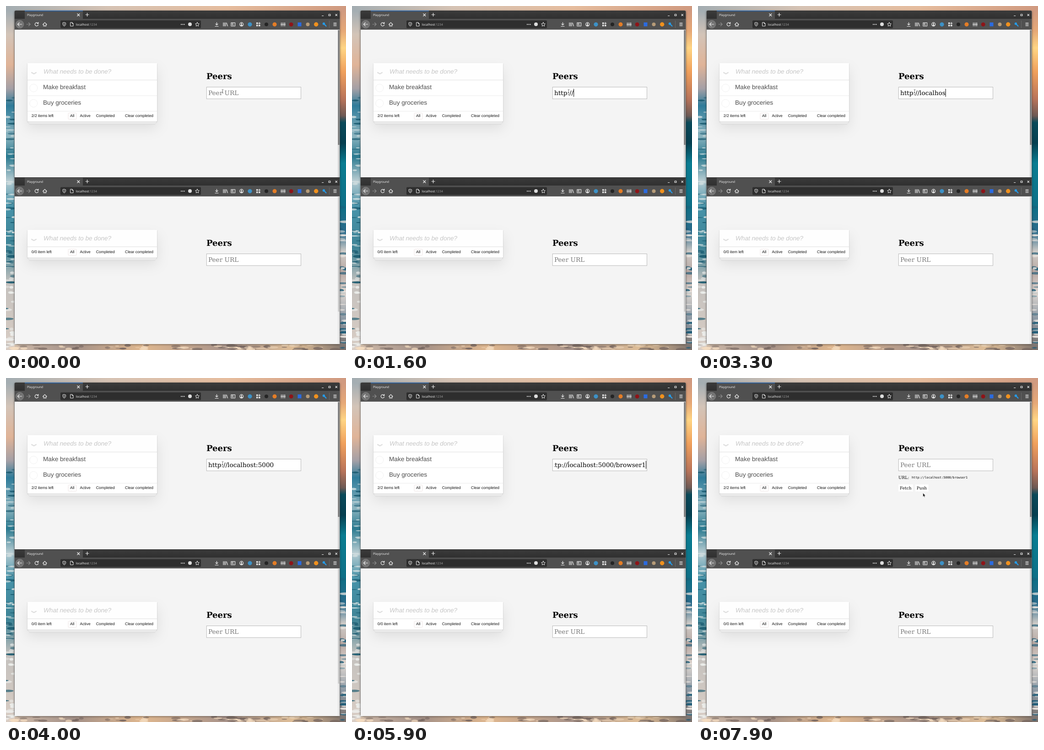
An HTML page that plays this animation: 743 px wide and 753 px high, repeating every 8000 ms.

```html
<!DOCTYPE html>
<html lang="en">
<head>
<meta charset="utf-8">
<title>Playground</title>
<style>
  html, body { margin: 0; width: 100%; height: 100%; overflow: hidden; }
  svg { display: block; width: 743px; height: 753px; }
  text { text-rendering: geometricPrecision; white-space: pre; }
  .ui { font: 6.8px "Noto Sans", sans-serif; fill: #f2f2f2; }
  .tab { font-size: 6.5px; }
  .todo { font: 13.6px "Liberation Sans", Arial, sans-serif; fill: #4d4d4d; }
  .prompt { font-style: italic; fill: #c6c6c6; }
  .foot { font: 8.5px "Liberation Sans", Arial, sans-serif; fill: #111; }
  .serif { font: 13.6px "DejaVu Serif", serif; fill: #000; }
  .head { font: bold 18px "DejaVu Serif", serif; }
  .small { font: 9px "DejaVu Serif", serif; }
  .mono { font: 6.78px "DejaVu Sans Mono", monospace; }
  .hint { fill: #777; }
  .line { fill: none; stroke: #ededed; stroke-width: 1.2; stroke-linecap: round; stroke-linejoin: round; }
  .thin { stroke-width: 1; }
  .window { filter: drop-shadow(0 1px 2px rgba(0,0,0,.45)); }
  .card { filter: drop-shadow(0 1px 1.2px rgba(0,0,0,.2)) drop-shadow(0 14px 14px rgba(0,0,0,.09)); }
</style>
</head>
<body>
<svg viewBox="0 0 743 753">
  <defs>
    <linearGradient id="sky">
      <stop offset="0" stop-color="#a3adb2"/><stop offset=".3" stop-color="#d6c3b4"/>
      <stop offset=".65" stop-color="#e6bd9e"/><stop offset="1" stop-color="#d09a80"/>
    </linearGradient>
    <linearGradient id="sand">
      <stop offset="0" stop-color="#d5c0ae"/><stop offset=".2" stop-color="#a39087"/><stop offset=".4" stop-color="#dfb78f"/>
      <stop offset=".65" stop-color="#a8938a"/><stop offset=".85" stop-color="#e0bf98"/><stop offset="1" stop-color="#7d716b"/>
    </linearGradient>
    <linearGradient id="west" x2="0" y2="1">
      <stop offset="0" stop-color="#a3adb2"/><stop offset=".07" stop-color="#d3c4b8"/><stop offset=".16" stop-color="#e0b498"/>
      <stop offset=".23" stop-color="#a5a0a6"/><stop offset=".28" stop-color="#2f7c9a"/><stop offset=".37" stop-color="#8db5c0"/>
      <stop offset=".43" stop-color="#2b7a90"/><stop offset=".5" stop-color="#b6cbd1"/><stop offset=".58" stop-color="#4793a9"/>
      <stop offset=".7" stop-color="#3f8496"/><stop offset=".8" stop-color="#c4c1be"/><stop offset="1" stop-color="#d9cdc4"/>
    </linearGradient>
    <linearGradient id="east" x2="0" y2="1">
      <stop offset="0" stop-color="#d09a80"/><stop offset=".06" stop-color="#e6a877"/><stop offset=".11" stop-color="#ffd584"/>
      <stop offset=".18" stop-color="#f0a05c"/><stop offset=".26" stop-color="#b9745a"/><stop offset=".31" stop-color="#6e5a55"/>
      <stop offset=".33" stop-color="#0a4a5a"/><stop offset=".39" stop-color="#063f50"/><stop offset=".45" stop-color="#0a7d92"/>
      <stop offset=".58" stop-color="#0f6f86"/><stop offset=".65" stop-color="#2b6b8b"/><stop offset=".71" stop-color="#d0ccc8"/>
      <stop offset=".77" stop-color="#b8a9a4"/><stop offset=".83" stop-color="#ded6d0"/><stop offset=".91" stop-color="#8b98a4"/>
      <stop offset="1" stop-color="#7d716b"/>
    </linearGradient>
    <linearGradient id="strip" x2="0" y2="1">
      <stop offset="0" stop-color="#3b3b3b"/><stop offset="1" stop-color="#303030"/>
    </linearGradient>
    <clipPath id="field"><rect x="442" y="179" width="201.5" height="23"/></clipPath>
    <clipPath id="frame"><rect x="18.5" y="10" width="711" height="365"/></clipPath>

    <g id="chrome">
      <path d="M18.5 375V13q0-3 3-3H726.5q3 0 3 3V375Z" fill="#f4f4f4"/>
      <path d="M18.5 28V13q0-3 3-3H726.5q3 0 3 3V28Z" fill="url(#strip)"/>
      <path d="M18.5 28H729.5V51.7H18.5ZM41 10.5H168V28H41Z" fill="#505050"/>
      <text class="ui tab" x="46" y="21.7">Playground</text>
      <path class="line" d="M155.800 17l5 5m0-5l-5 5M174 19h7m-3.500-3.500v7"/>
      <path class="line" d="M690.500 21.500h3.200M705.300 18h3.500v3.500h-3.500ZM720 17.800l3.600 3.600m0-3.600l-3.600 3.600"/>

      <circle cx="30" cy="40" r="8.700" fill="#737373" stroke="#8c8c8c" stroke-width=".7"/>
      <path class="line" d="M34.500 40h-9m3.700-3.800l-3.800 3.800 3.800 3.800"/>
      <path class="line" d="M45 40h8m-3.500-3.500l3.500 3.500-3.500 3.500" style="stroke:#8d8d8d"/>
      <path class="line" d="M70 38a3.700 3.700 0 1 0 .5 3M70.700 35.700v2.800h-2.800M80.500 40.500l4.300-4.300 4.300 4.300M82 40v4h5.600v-4M84.800 44v-2"/>

      <rect x="119" y="31.500" width="307" height="17" rx="2" fill="#2e2e2e"/>
      <path class="line thin" d="M127.300 36l3.200 1v3q-.3 2.700-3.200 4.200-2.900-1.500-3.200-4.200v-3ZM127.300 38v4M141 36h3.500l2.500 2.500v5.500h-6ZM144.500 36v2.500h2.500"/>
      <text class="ui" x="152.700" y="42.500">localhost<tspan fill="#9a9a9a">:1234</tspan></text>
      <path class="line" d="M383 40.300h.01M386.300 40.300h.01M389.600 40.300h.01" style="stroke-width:2.200"/>
      <circle cx="402" cy="40" r="4" fill="#dcdcdc"/>
      <path class="line thin" d="M418 35.800l1.300 2.800 3 .4-2.200 2.100.6 3.100-2.700-1.500-2.700 1.500.6-3.100-2.200-2.100 3-.4Z"/>

      <path class="line" d="M460.500 36v5.500m-2.600-2.400l2.600 2.600 2.600-2.600M457 44.500h7"/>
      <path class="line" d="M475 36.500v7.500M477.500 36.500v7.500M480 36.500v7.500M482 37l2.300 7"/>
      <path class="line" d="M492 36.500h8.500v7.500h-8.500ZM496 36.500v7.500M493.700 38.500h.8m-.8 2h.8"/>
      <circle class="line" cx="514.700" cy="40.200" r="4"/>
      <path d="M512 43q0-2 2.700-2 2.700 0 2.700 2l-2.700 1Z" fill="#ededed"/>
      <circle cx="514.700" cy="39" r="1.500" fill="#ededed"/>
      <circle cx="533" cy="40.300" r="4.600" fill="#3d91c6"/>
      <path d="M547 36h3.500v3.500h-3.500Zm0 5h3.500v3.500h-3.500Zm5 0h3.500v3.500h-3.500Z" fill="#e6e6e6"/>
      <path class="line" d="M551.800 37.800h4m-2-2v4"/>
      <circle cx="569" cy="40.300" r="4" fill="#242424"/>
      <circle cx="587" cy="40.300" r="4.500" fill="#e47d26"/>
      <path class="line thin" d="M601.500 36.500v7.500M604.300 36.500v7.500M607.100 36.500v7.500M609.500 36.500v7.500M600.500 40.300h10"/>
      <circle cx="623.200" cy="40.300" r="4.400" fill="#8e1418"/>
      <rect x="637.500" y="36" width="8" height="8.500" fill="#2b6be0"/>
      <circle cx="659.500" cy="40.300" r="4" fill="#b69b78"/>
      <circle cx="677.700" cy="40.300" r="4.700" fill="#f0911e"/>
      <path d="M694.800 39l4.700 5" stroke="#249bea" stroke-width="2.200" stroke-linecap="round"/>
      <circle cx="694.500" cy="38.700" r="2.700" fill="#249bea"/>
      <path d="M706.500 32v16" stroke="#747474" stroke-width=".7"/>
      <path class="line" d="M716 37.300h6M716 40.200h6M716 43.100h6"/>

      <text class="serif head" x="438" y="160">Peers</text>
      <rect x="438.300" y="177.500" width="206.200" height="25.700" fill="#fff" stroke="#b9b9b9"/>
    </g>

    <g id="entry">
      <rect x="47" y="125" width="283" height="37.500" fill="#fefefe"/>
      <path d="M47 162h283" stroke="#dedede"/>
      <path d="M55.300 145.300l5.700 3.200 5.700-3.200" fill="none" stroke="#dedede" stroke-width="2.300"/>
      <text class="todo prompt" x="82" y="148.300">What needs to be done?</text>
    </g>

    <g id="filters">
      <rect x="136" y="234.300" width="18" height="13.500" rx="1.500" fill="none" stroke="#eadfdf" stroke-width=".8"/>
      <text class="foot" x="140" y="243.300">All</text>
      <text class="foot" x="161.600" y="243.300">Active</text>
      <text class="foot" x="196.700" y="243.300">Completed</text>
      <text class="foot" x="260" y="243.300">Clear completed</text>
    </g>

    <g id="stack">
      <path d="M50.400 253h276.200v5.600h-276.200Z" fill="#f6f6f6"/>
      <path d="M50.400 258.800h276.200" stroke="#c9c9c9" stroke-width=".8"/>
      <path d="M48.700 253h279.600v2.800h-279.600Z" fill="#f6f6f6"/>
      <path d="M48.700 256h279.600" stroke="#c9c9c9" stroke-width=".8"/>
    </g>
    <path id="paperEdge" d="M47 253.200h283" stroke="#c9c9c9" stroke-width=".8"/>
  </defs>

  <rect width="743" height="753" fill="url(#sky)"/>
  <rect y="738" width="743" height="15" fill="url(#sand)"/>
  <rect y="10" width="19" height="743" fill="url(#west)"/>
  <rect x="729" y="10" width="14" height="743" fill="url(#east)"/>
  <g id="foam"></g>
  <rect class="window" x="18.500" y="10" width="711" height="730" rx="3" fill="#333"/>

  <g clip-path="url(#frame)">
    <use href="#chrome"/>
    <path d="M41 10.800h127" stroke="#2463ad" stroke-width="1.600"/>
    <path d="M727 52v323" stroke="#cfcfcf" stroke-width="3.500"/>
    <path d="M727 53v251" stroke="#737373" stroke-width="3"/>
    <rect class="card" x="47" y="125" width="283" height="128" fill="#fff"/>
    <use href="#stack"/>
    <rect x="47" y="162" width="283" height="91" fill="#fff"/>
    <use href="#paperEdge"/>
    <use href="#entry"/>
    <path d="M47 196.300h283M47 230.300h283" stroke="#ebebeb"/>
    <g fill="none" stroke="#ededed" stroke-width=".8">
      <circle cx="60.200" cy="179.500" r="8.500"/><circle cx="60.200" cy="213" r="8.500"/>
    </g>
    <text class="todo" x="81" y="182">Make breakfast</text>
    <text class="todo" x="81" y="216">Buy groceries</text>
    <text class="foot" x="55.800" y="243.300">2/2 items left</text>
    <use href="#filters"/>
  </g>

  <g transform="translate(0 365)" clip-path="url(#frame)">
    <use href="#chrome"/>
    <path d="M18 10.300h712" stroke="#292929"/>
    <path d="M727 52v323" stroke="#e5e5e5" stroke-width="3.500"/>
    <path d="M727 53v251" stroke="#c6c6c6" stroke-width="3"/>
    <rect class="card" x="47" y="125" width="283" height="61" fill="#fff"/>
    <g transform="translate(0 -67)">
      <use href="#stack"/>
      <rect x="47" y="229" width="283" height="24" fill="#fff"/>
      <use href="#paperEdge"/>
      <text class="foot" x="55.800" y="243.300">0/0 item left</text>
      <use href="#filters"/>
    </g>
    <use href="#entry"/>
    <text class="serif hint" x="442" y="195">Peer URL</text>
  </g>

  <g id="peer">
    <text class="serif small" x="438" y="221">URL:</text>
    <text class="serif mono" x="467" y="220.300">http://localhost:5000/browser1</text>
    <path d="M438 233h31.500v15.500h-31.500ZM475 233h28.500v15.500h-28.500Z" fill="#fff"/>
    <text class="serif small" x="441" y="243.700">Fetch</text>
    <text class="serif small" x="477.800" y="243.700">Push</text>
  </g>
  <g clip-path="url(#field)">
    <text id="hint" class="serif hint" x="442" y="195">Peer URL</text>
    <text id="typed" class="serif" x="442" y="195"></text>
  </g>
  <rect id="caret" y="181.300" width="1" height="17.400"/>
  <path id="beam" d="M-1.800-4q1.800 0 1.800 1 0-1 1.800-1M-1.800 4q1.800 0 1.800-1 0 1 1.800 1M0-3v6" fill="none" stroke="#666" stroke-width=".9"/>
  <path id="arrow" d="M0 0v7.800l1.800-1.600 1.300 2.900 1.300-.6-1.300-2.800h2.400Z" fill="#111" stroke="#fff" stroke-width=".5"/>
</svg>
<script>
const $ = id => document.getElementById(id);
const LOOP = 8000, URL_TEXT = "http://localhost:5000/browser1";
const LEFT = 442, CARET_MAX = 642;

// [time, characters typed, caret shown]
const typing = [
  [0, 0, 0], [500, 0, 1], [600, 1, 1], [700, 2, 1], [800, 3, 1], [900, 4, 1], [1200, 5, 1],
  [1500, 6, 1], [1600, 7, 1], [1800, 8, 1], [2000, 9, 1], [2100, 10, 1], [2200, 11, 1],
  [2300, 12, 1], [2500, 14, 1], [3300, 15, 1], [3400, 17, 1], [3500, 19, 1], [3600, 21, 1],
  [4000, 21, 0], [4700, 22, 1], [5000, 23, 1], [5100, 24, 1], [5200, 25, 0], [5300, 26, 1],
  [5500, 27, 1], [5600, 28, 1], [5700, 29, 1], [5900, 30, 1], [6100, 0, 1], [6400, 0, 0]
];
// [time, x, y, pointer]
const mouse = [
  [0, 473.5, 186.7, "beam"], [6900, 468, 185, "beam"], [7000, 481, 208, "arrow"],
  [7100, 497, 225, "arrow"], [7300, 495, 231, "arrow"], [7400, 492.5, 236, "arrow"],
  [7500, 491.7, 241, "arrow"], [7800, 491.7, 246, "arrow"], [7900, 491.7, 252, "arrow"]
];

const at = (steps, t) => steps.findLast(step => step[0] <= t);
const show = (id, on) => $(id).setAttribute("visibility", on ? "visible" : "hidden");

function drawFoam() {
  let seed = 7;
  const random = () => (seed = seed * 16807 % 2147483647) / 2147483647;
  const streak = (x, y, color) =>
    `<ellipse cx="${x}" cy="${y}" rx="${4 + random() * 9}" ry="${.8 + random() * 2.6}" fill="${color}" opacity="${.4 + random() * .5}"/>`;
  let marks = "";
  for (let i = 0; i < 75; i++) {
    marks += streak(random() * 19, 200 + random() * 550, i % 3 ? "#eef0ee" : "#14566c");
    if (i < 40) marks += streak(730 + random() * 13, 440 + random() * 310, i % 2 ? "#efe8e2" : "#1f5c78");
    marks += streak(random() * 743, 742 + random() * 11, i % 2 ? "#f4dcc0" : "#75655f");
  }
  $("foam").innerHTML = marks;
}

function draw() {
  const t = performance.now() % LOOP;
  const [, count, caretOn] = at(typing, t);
  const typed = $("typed");
  typed.textContent = URL_TEXT.slice(0, count);
  const width = count ? typed.getComputedTextLength() : 0;
  const scroll = Math.max(0, LEFT + width - CARET_MAX);
  typed.setAttribute("x", LEFT - scroll);
  $("caret").setAttribute("x", LEFT + width - scroll);
  show("caret", caretOn);
  show("hint", !count);
  show("peer", t >= 6100);

  const [, x, y, pointer] = at(mouse, t);
  for (const id of ["beam", "arrow"]) show(id, id === pointer);
  $(pointer).setAttribute("transform", `translate(${x} ${y})`);
  requestAnimationFrame(draw);
}

drawFoam();
draw();
</script>
</body>
</html>
```
